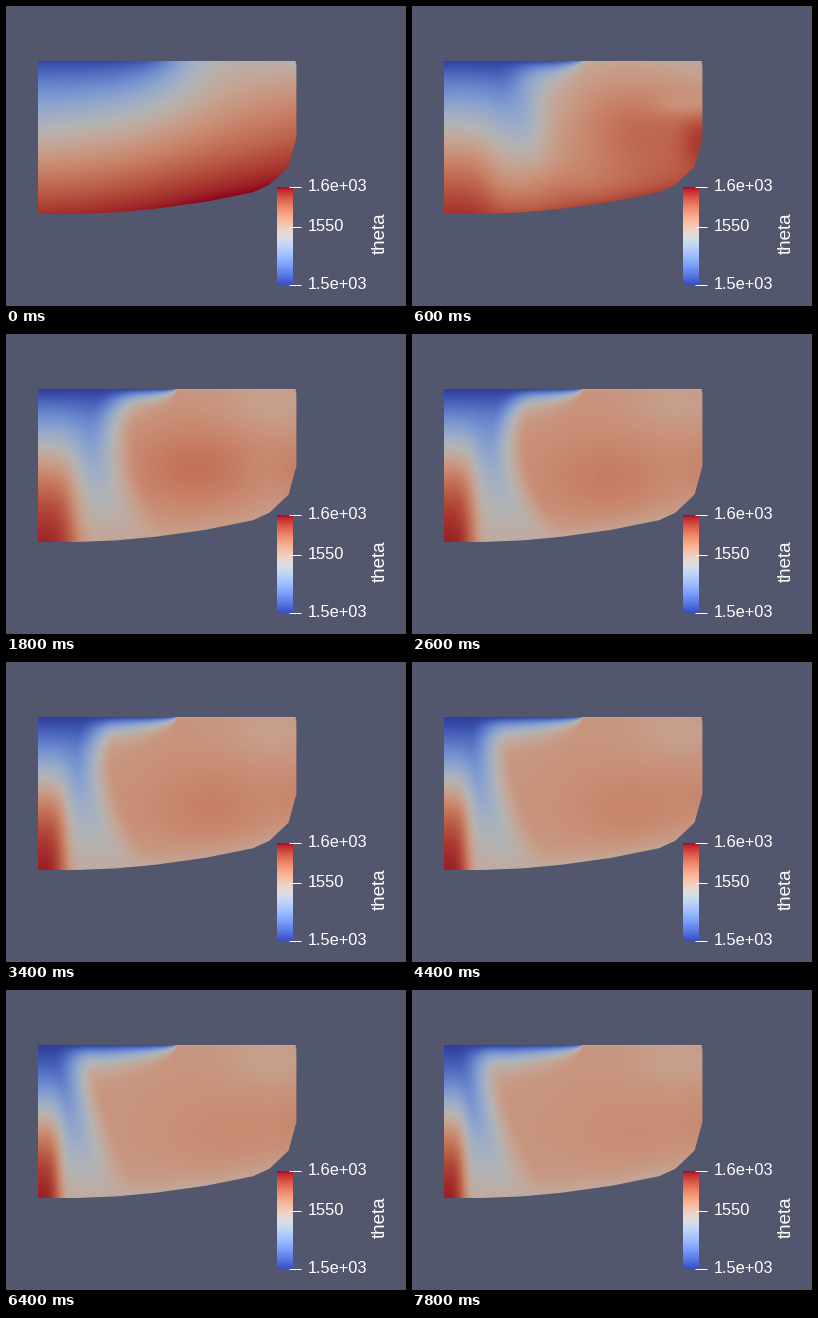
Recreate the animation shown at these times as a matplotlib script. Size 400 px wide and 300 px high, loop 8 s.

```python
import numpy as np
import matplotlib.pyplot as plt
from matplotlib.animation import FuncAnimation
from matplotlib.colors import ListedColormap
from matplotlib.patches import Polygon

W, H, DPI = 400, 300, 100
FRAMES, STEP = 40, 200
LEFT, TOP, RIGHT, BOTTOM = 32, 55, 291, 209

# Shape of the flow over time, in seconds and stage pixels
TIMES = [1.0, 1.8, 2.6, 4.4, 6.4, 7.8]
KEYS = dict(
    plume_top=[86, 84, 80, 56, 48, 46],
    plume_mid=[100, 86, 80, 67, 64, 62],
    plume_low=[106, 108, 106, 91, 86, 86],
    fade=[52, 48, 38, 42, 42, 42],
    chill=[.05, .10, .10, .04, 0, 0],
    hot_width=[50, 40, 32, 26, 23.5, 22],
    hot_y=[118, 112, 112, 118, 122, 122],
    hot_soft=[34, 31, 28, 26, 25, 25],
    core=[.17, .12, .08, .06, .04, .03],
    core_x=[212, 190, 195, 222, 228, 225],
    core_y=[126, 134, 145, 148, 146, 145],
    bulk=[.66, .66, .67, .665, .665, .665],
    wall=[.22, .06, .04, .03, .03, .03],
    wedge=[.13, 0, 0, 0, 0, 0],
    floor=[-.16, .05, .08, .09, .09, .09],
    foot=[.24, .04, 0, 0, 0, 0],
)

X, Y = np.meshgrid(np.arange(LEFT, RIGHT) + .5, np.arange(TOP, BOTTOM) + .5)


def smooth(s):
    s = np.clip(s, 0, 1)
    return s * s * (3 - 2 * s)


def sigmoid(s):
    return 1 / (1 + np.exp(-s))


def bump(cx, cy, sx, sy):
    return np.exp(-((X - cx) / sx) ** 2 - ((Y - cy) / sy) ** 2)


def floor_y(x):
    return 208 - 22 * (np.clip(x - LEFT, 0, None) / 215) ** 2.2


def layered(x, y):
    """Still state: cold lid on the left, hot floor."""
    spread = 14 + .5 * np.clip(y - TOP, 0, None)
    lid = .02 + .5 * sigmoid((x - 168) / spread)
    base = .94 + .06 * smooth((x - LEFT) / 200)
    h = np.clip((y - TOP) / (floor_y(x) - TOP), 0, 1)
    return lid + (base - lid) * h ** .85


def swirled(turn):
    """Still state carried round by the main cell."""
    dx, dy = (X - 205) / 100, (Y - 122) / 70
    a = turn * np.clip(1.2 - dx ** 2 - dy ** 2, 0, None)
    c, s = np.cos(a), np.sin(a)
    return layered(205 + 100 * (dx * c - dy * s),
                   122 + 70 * (dx * s + dy * c))


def convecting(t):
    """Cold plume between a hot left corner and a warm cell."""
    p = {name: np.interp(t, TIMES, vals) for name, vals in KEYS.items()}
    u = (Y - TOP) / 152
    q = (u - .5) / .35
    axis = (p["plume_mid"] + q * (p["plume_low"] - p["plume_top"]) / 2
            + q * q * ((p["plume_low"] + p["plume_top"]) / 2 - p["plume_mid"]))
    cold = (p["chill"] * (1 - u) + .78 * u - .22 * u ** 2
            + p["foot"] * u ** 4)
    corner = sigmoid((Y - p["hot_y"]) / p["hot_soft"])
    cell = (p["bulk"]
            + p["core"] * bump(p["core_x"], p["core_y"], 70, 45)
            + p["wall"] * bump(291, 134, 22, 30)
            - p["wedge"] * bump(275, 99, 34, 12)
            - .05 * bump(265, 70, 45, 25)
            - p["floor"] * np.exp(-np.clip(floor_y(X) - Y, 0, None) / 13))
    v = (cold
         + (corner - cold) * np.exp(-((X - LEFT) / p["hot_width"]) ** 4)
         + (cell - cold) * smooth((X - axis) / p["fade"]))
    depth = .5 + 14 * np.sqrt(np.clip((170 - X) / 75, 0, 1))
    return v * (1 - np.exp(-((Y - TOP + .5) / depth) ** 1.2))


def field(i):
    t = i * STEP / 1000
    if t >= 1:
        return convecting(t)
    return (1 - t) * swirled(1.2 * t) + t * convecting(1)


warm = plt.get_cmap("coolwarm")
shades = warm(np.linspace(0, 1, 256))
shades[:, :3] *= .81

fig = plt.figure(figsize=(W / DPI, H / DPI), dpi=DPI, facecolor="#52576e")
ax = fig.add_axes([0, 0, 1, 1])
ax.axis("off")

body = Polygon([(32, 55), (289.5, 55), (290.4, 60), (290.4, 132),
                (282.6, 160.5), (263.5, 178.7), (247, 186.2), (200, 195.7),
                (150, 202.7), (110, 206.4), (70, 208), (32, 208)],
               transform=ax.transData, fc="none", ec="none")
ax.add_patch(body)
image = ax.imshow(field(0), cmap=ListedColormap(shades), vmin=0, vmax=1,
                  extent=(LEFT, RIGHT, BOTTOM, TOP), interpolation="bilinear")
image.set_clip_path(body)

ax.imshow(np.linspace(1, 0, 256)[:, None], cmap=warm, vmin=0, vmax=1,
          extent=(271, 287, 279, 181), interpolation="nearest")
ax.set_xlim(0, W)
ax.set_ylim(H, 0)
ax.set_aspect("auto")


def label(x, y, text, px, **kw):
    ax.text(x, y, text, color="white", family="Liberation Sans",
            size=px * 72 / DPI, va="baseline", **kw)


for y, base, text in [(180.5, 185, "1.6e+03"), (220.5, 225, "1550"),
                      (278.5, 283, "1.5e+03")]:
    ax.plot([283, 294.5], [y, y], color="white", lw=72 / DPI,
            solid_capstyle="butt")
    label(301.5, base, text, 16.4)
label(379, 248.5, "theta", 18.8, rotation=90, rotation_mode="anchor")


def draw(i):
    image.set_data(np.clip(field(i), 0, 1))
    return image,


anim = FuncAnimation(fig, draw, frames=FRAMES, interval=STEP,
                     repeat=True, repeat_delay=0)
plt.show()
```
